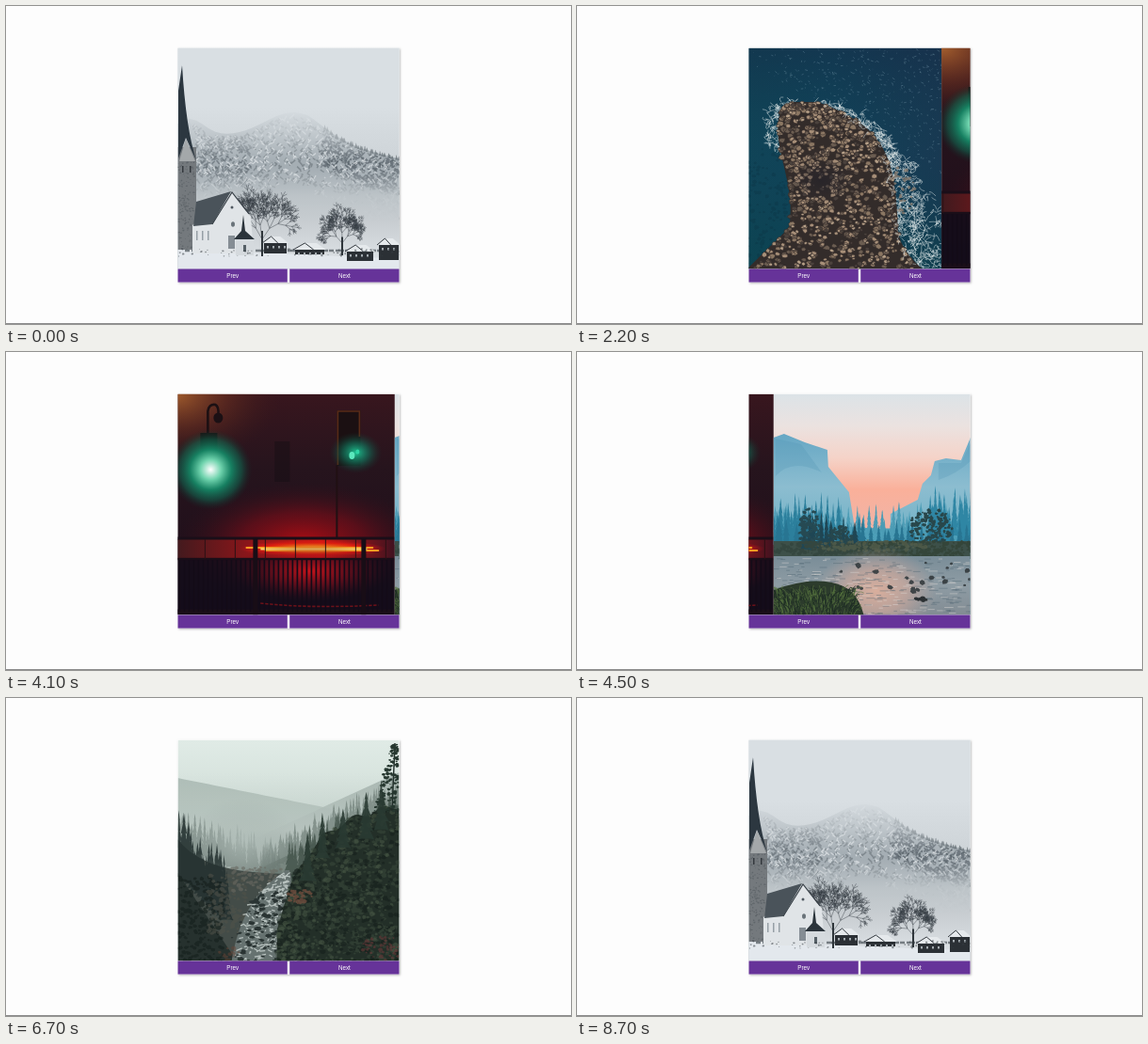
An HTML page for the animation above (9.4 s loop, 600 by 338 pixels).

```html
<!DOCTYPE html>
<html lang="en">
<head>
<meta charset="utf-8">
<title>Image carousel</title>
<style>
html, body { margin: 0; width: 100%; height: 100%; overflow: hidden; background: #fdfdfd; }
svg { display: block; width: 100vw; height: 100vh; }
text { font: 6.27px "Liberation Sans", Arial, sans-serif; fill: #fff; text-anchor: middle; }
</style>
</head>
<body>
<svg id="stage" viewBox="0 0 600 338"></svg>
<script>
const LEFT = 182.5, TOP = 44.5, SIZE = 235, RIGHT = LEFT + SIZE, BASE = TOP + SIZE;
const LOOP = 9400, SLIDE = 600, STARTS = [50, 2050, 4040, 6060, 8050];

let seed = 4217;
const rnd = () => (seed = seed * 16807 % 2147483647) / 2147483647;
const span = (a, b) => a + rnd() * (b - a);
const fix = v => v.toFixed(1);
const many = (n, fn) => Array.from({ length: n }, (_, i) => fn(i)).join('');
const bump = (x, mid, w) => Math.exp(-(((x - mid) / w) ** 2));
const fade = (x, from, w) => Math.exp(-(x - from) / w);

const path = (d, fill, o = 1, more = '') => `<path d="${d}" fill="${fill}" opacity="${o}" ${more}/>`;
const poly = (pts, fill, o) => path(`M${pts}Z`, fill, o);
const line = (d, color, w, o, more = '') => path(d, 'none', o, `stroke="${color}" stroke-width="${w}" ${more}`);
const rect = (x, y, w, h, fill, more = '') =>
  `<rect x="${x}" y="${y}" width="${w}" height="${h}" fill="${fill}" ${more}/>`;
const oval = (x, y, rx, ry, fill) => `<ellipse cx="${x}" cy="${y}" rx="${rx}" ry="${ry}" fill="${fill}"/>`;
const full = fill => rect(LEFT - 3, TOP, SIZE + 6, SIZE, fill);

// Points of a curve y = fn(x), or x = fn(y) when upright
function trace(fn, from, to, upright) {
  const n = 36;
  return many(n + 1, i => {
    const u = from + (to - from) * i / n;
    return (upright ? [fn(u), u] : [u, fn(u)]).map(fix).join() + ' ';
  });
}
const hill = (fn, fill, o, x1 = LEFT, x2 = RIGHT, y = BASE) =>
  poly(`${trace(fn, x1, x2)}${x2},${y} ${x1},${y}`, fill, o);
const strip = (a, b, y1, y2, fill) => poly(trace(a, y1, y2, true) + trace(b, y2, y1, true), fill);

// Gradient stops are evenly spaced "color opacity"
const stops = list => list.map((s, i) => {
  const [c, a = 1] = s.split(' ');
  return `<stop offset="${i / (list.length - 1)}" stop-color="${c}" stop-opacity="${a}"/>`;
}).join('');
const down = (id, y1, y2, ...list) =>
  `<linearGradient id="${id}" gradientUnits="userSpaceOnUse" x1="0" y1="${y1}" x2="0" y2="${y2}">${stops(list)}</linearGradient>`;
const across = (id, ...list) => `<linearGradient id="${id}">${stops(list)}</linearGradient>`;
const glow = (id, ...list) => `<radialGradient id="${id}">${stops(list)}</radialGradient>`;

function chunk(x, y, r, flat = .8) {
  const turn = rnd() * 6, n = 6;
  return 'M' + many(n, i => {
    const a = turn + i * Math.PI * 2 / n, q = r * span(.65, 1.2);
    return `${fix(x + Math.cos(a) * q)},${fix(y + Math.sin(a) * q * flat)} `;
  }) + 'Z';
}
const dash = (x, y, dx, dy) => `M${fix(x)},${fix(y)}l${fix(dx)},${fix(dy)}`;
const curl = (x, y, s) => `M${fix(x)},${fix(y)}q` + many(4, () => fix(span(-s, s)) + ' ');
const specks = (n, x1, x2, y1, y2, r, color, o) =>
  path(many(n, () => chunk(span(x1, x2), span(y1, y2), span(r * .4, r))), color, o);
const bush = (n, x, y, rx, ry, color, o) => path(many(n, () => {
  const a = rnd() * 6.28, q = Math.sqrt(rnd());
  return chunk(x + Math.cos(a) * q * rx, y + Math.sin(a) * q * ry, span(1, 2.8));
}), color, o);

function pine(x, y, h, w) {
  let l = '', r = '';
  for (let i = 1; i <= 6; i++) {
    const yy = y - h + h * i / 6, q = w * i / 12 * span(.7, 1.2);
    r += `L${fix(x + q)},${fix(yy)}L${fix(x + q * .55)},${fix(yy - 1)}`;
    l = `L${fix(x - q * .55)},${fix(yy - 1)}L${fix(x - q)},${fix(yy)}` + l;
  }
  return `M${fix(x)},${fix(y - h)}${r}${l}Z`;
}
// A row of pines whose feet follow foot(x)
const pines = (n, x1, x2, foot, h, w, color, o) => path(many(n, i => {
  const x = x1 + (x2 - x1) * (i + rnd()) / n;
  return pine(x, foot(x), span(h * .55, h), w * span(.8, 1.2));
}), color, o);

function branch(x, y, a, len, depth) {
  const x2 = x + Math.cos(a) * len, y2 = y + Math.sin(a) * len;
  const d = dash(x, y, x2 - x, y2 - y);
  if (!depth) return d;
  const side = s => branch(x2, y2, a + s * span(.4, .9), len * span(.55, .8), depth - 1);
  return d + branch(x2, y2, a + span(-.2, .2), len * .84, depth - 1) + side(-1) + side(1);
}
const bareTree = (x, y, len) =>
  line(`M${x},${y}v${-len * 1.5}`, '#2d3439', 2) + line(branch(x, y, -1.57, len, 6), '#353d43', .55, .8);

function house(x, y, w, h) {
  return rect(x, y, w, h, '#2b3035') +
    path(`M${x - 2},${y + 1}l${w * .4},-7h${w * .4}l${w * .2 + 4},7Z`, '#e5e9ec') +
    line(`M${x - 2},${y + 1}l${w * .4},-7l${w * .3},7`, '#343a40', 1) +
    many(Math.floor(w / 6), i => rect(x + 3 + i * 6, y + 4, 2, 2.5, '#a5acb1'));
}

function village() {
  const ridge = x => 138 + Math.max(0, x - 320) / 4 - 25 * bump(x, 305, 42) - 18 * bump(x, 195, 22);
  const crags = (n, x1, x2, depth, color, w, o) => line(many(n, () => {
    const x = span(x1, x2), lean = rnd() < .5 ? -1 : 1;
    return dash(x, ridge(x) + 2 + rnd() * depth, lean * span(1, 4), span(1, 4));
  }), color, w, o);
  return full('url(#winter)') + hill(ridge, '#a5aeb4') +
    crags(600, 200, RIGHT, 72, '#5c666d', 1.5, .5) + crags(220, 200, 258, 55, '#4f5961', 1.6, .5) +
    crags(320, 335, RIGHT, 36, '#465159', 1.7, .6) + crags(450, 200, RIGHT, 72, '#e4e9ec', 1.2, .7) +
    pines(30, 338, RIGHT, x => ridge(x) + 3, 7, 4, '#59636a', .8) +
    full('url(#haze)') + full('url(#fog)') +
    hill(x => 260 + (x - 200) / 26, '#e3e8ed') +
    line(`M190,260H${RIGHT}`, '#4c555b', 2.5, .7, 'stroke-dasharray="5 2 9 1"') +
    rect(LEFT, 150, 19.5, 109, '#74797d') + specks(170, 183, 201, 165, 258, 1.2, '#53595e', .6) +
    many(2, i => rect(187 + i * 8, 170, 1.5, 7, '#34393e')) +
    path('M187,63Q191,130 202,164L191,140L183,162V90Z', '#2c3740') + poly('191,141 201,165 184,165', '#a4a8aa') +
    bareTree(272, 266, 18) + bareTree(357, 265, 13) +
    poly('240,198 260,224 263,263 198,263 198,233', '#e0e4e7') +
    poly('202,208 239,197 219,232 199,234', '#4a535a') + line('M219,232L240,198L258,221', '#384047', 1.2) +
    oval(240, 214, 1.5, 1.5, '#505961') + oval(241, 232, 2, 2.8, '#6a737a') +
    many(3, i => rect(202 + i * 6, 239, 1.5, 10, '#969fa6')) + rect(236, 244, 7, 14, '#858d94') +
    house(274, 251, 24, 12) + house(307, 258, 31, 6) + house(362, 260, 28, 11) + house(396, 253, 21, 17) +
    rect(244, 247, 19, 18, '#d5dade') + path('M252,222L254,239L264,248H242L250,239Z', '#2b343b') +
    rect(252, 254, 3, 7, '#566067') + specks(80, 183, RIGHT, 258, 266, 1.4, '#353d43', .55);
}

function shore() {
  const west = y => 250 + 16 * fade(y, 100, 8) + 7 * Math.sin((y - 170) / 30) - .8 * Math.max(0, y - 235);
  const east = y => 372 - 92 * fade(y, 100, 30) + 27 * (Math.max(0, y - 235) / 46) ** 2;
  const stones = (n, color, r) => path(many(n, () => {
    const y = span(103, 281), a = west(y);
    return chunk(a + rnd() * (east(y) - a), y, span(r * .55, r));
  }), color, 1, 'stroke="#332b29" stroke-width=".6"');
  const foam = (n, y1, y2, side, a, b, size) => line(many(n, () => {
    const y = span(y1, y2);
    return curl(side(y) + span(a, b), y, size);
  }), '#dfe8e8', .8, .6);
  return full('url(#sea)') + full('url(#deep)') +
    specks(240, LEFT, 258, 150, BASE, 3, '#0b3040', .3) +
    line(many(420, () => {
      const k = Math.sqrt(rnd());
      return dash(205 + k * 212, span(45, 55 + k * 125), span(-1, 3), span(-1, 2));
    }), '#86a9ba', .6, .5) +
    foam(110, 101, 155, west, -13, 5, 7) + foam(230, 101, 170, east, -6, 14, 7) +
    foam(260, 165, BASE, east, -4, 28, 7) + foam(120, 200, 275, east, 8, 44, 8) +
    strip(west, east, 102, 281, '#332c2a') +
    many(3, i => stones(230, ['#6b5d51', '#8b7763', '#a78f78'][i], 4.4 - i * .4)) +
    stones(170, '#b59f87', 2.7) + stones(130, '#4b423d', 3) +
    bush(45, 374, 195, 15, 26, '#8d7e70', .8) + foam(110, 102, BASE, east, -5, 8, 5) +
    oval(290, 185, 34, 24, 'url(#shade)');
}

function signals() {
  const fence = (n, gap, y1, y2, w, color) => line(many(n, i => `M${184 + i * gap},${y1}V${y2}`), color, w);
  const bar = (y, w) => rect(LEFT, y - w / 2, SIZE, w, '#1a0e18');
  return full('url(#night)') + oval(183, 45, 115, 75, 'url(#amber)') + oval(320, 203, 135, 65, 'url(#red)') +
    rect(290, 95, 16, 43, '#160e14', 'opacity=".5"') +
    line('M219,86V63Q220,55 227,56Q231,58 230,68', '#1c1013', 2.6) + oval(230, 70, 5, 5.5, '#1b1014') +
    rect(211, 86, 18, 42, '#1a1313') + oval(222, 125, 44, 43, 'url(#green)') +
    rect(356, 62, 25, 59, '#1b1012') + line('M357,120V63H380V90', '#69331a', 1.6, .8) +
    line('M356,120V198', '#211013', 2) + oval(376, 107, 28, 22, 'url(#teal)') +
    oval(372, 110, 3, 4, '#5be8bd') + oval(378, 106, 2, 2.5, '#2fd3a4') +
    rect(LEFT, 199, SIZE, 21, 'url(#road)') + oval(330, 209, 78, 9, 'url(#flare)') +
    line('M260,208H394M280,211H400', '#ff9a22', 1.8, 1, 'stroke-linecap="round"') + line('M275,209.5H388', '#ffdf70', 2) +
    rect(LEFT, 220, SIZE, 60, '#140d1b', 'opacity=".72"') + oval(328, 233, 82, 32, 'url(#spill)') +
    line('M274,267Q330,273 400,269', '#9c1419', 1.5, .65) +
    bar(198, 3) + bar(220, 2.4) + bar(276, 5) +
    fence(48, 5, 221, 276, 1.7, '#130b17') + fence(8, 32, 199, 220, 1, '#2b1115') +
    many(2, i => rect(267 + i * 115, 198, 5, 82, '#180d16'));
}

function valley() {
  const rough = (y, s) => () => y + span(-s, s);
  const ripples = (n, color, o) => line(many(n, () => dash(span(180, 412), span(219, BASE), span(3, 10), 0)), color, .8, o);
  const grass = (n, color, o) => line(many(n, () => {
    const x = span(178, 268), s = (x - 222) / 8 + span(-5, 5);
    return `M${fix(x)},${fix(span(256, 282))}q${fix(s / 3)},-8 ${fix(s)},${fix(span(-10, -4))}`;
  }), color, .9, o);
  return '<g transform="translate(1.5 0)">' + full('url(#dusk)') +
    poly('305,172 334,157 339,140 348,131 352,116 364,113 380,115 390,91 402,88 418,95 418,205 305,205', 'url(#cliff)') +
    poly('178,92 192,87 214,96 238,104 239,122 261,149 270,205 178,205', 'url(#cliff)') +
    path('M183,92L210,98L232,128Q200,112 183,132Z', '#4b8fb0', .25) +
    path('M356,118H380L391,95L396,110Q380,128 356,136Z', '#4b8fb0', .25) +
    hill(x => 188 - 14 * bump(x, 180, 60) - 18 * bump(x, 425, 60), '#4d9fb8') +
    pines(55, 180, 420, rough(195, 6), 34, 8, '#4c9cb5') +
    pines(18, 180, 250, rough(203, 5), 56, 10, '#2c7f9c') + pines(24, 345, 420, rough(200, 6), 58, 10, '#2f86a4') +
    pines(36, 180, 420, rough(205, 4), 30, 9, '#287592') +
    rect(178, 201, 242, 19, '#3d5049') + pines(9, 207, 268, rough(209, 4), 44, 11, '#1f4654') +
    bush(130, 219, 188, 11, 22, '#264a53') + bush(170, 348, 186, 23, 19, '#28474b') +
    bush(80, 252, 198, 13, 13, '#27474d') + bush(340, 335, 209, 88, 9, '#34453a') +
    bush(190, 230, 209, 55, 7, '#34463f') + bush(120, 285, 206, 60, 6, '#56604c', .7) +
    rect(178, 217, 242, 64, 'url(#river)') + oval(290, 254, 65, 46, 'url(#blush)') +
    ripples(230, '#4d626e', .5) + ripples(120, '#dcd8d6', .55) +
    specks(26, 250, 415, 224, 254, 4, '#343a3d', .9) +
    bush(16, 337, 263, 6, 2.5, '#2b3033') +
    path('M178,281V254Q225,236 255,249Q272,258 277,281Z', '#2c3b2c') +
    grass(240, '#56733f', .65) + grass(120, '#1b2a22', .8) + '</g>';
}

function gorge() {
  const crest = x => 112 + 125 * fade(x, 286, 34) + (RIGHT - x) * .1 + 3 * Math.sin(x / 5);
  const slope = x => 154 - .46 * (x - 276);
  const left = y => 232 + 65 * fade(y, 183, 45);
  const right = y => 298 + 5 * Math.sin((y - 176) / 12);
  const leaves = (n, color, o) => path(many(n, () => {
    const x = span(288, RIGHT);
    return chunk(x, span(crest(x) - 1, 281), span(1, 3.6));
  }), color, o);
  return full('url(#pale)') + hill(x => 85 + (x - 182) * .2, '#a9b8b2', .9) +
    hill(x => slope(x) - 10, '#a4b2ac', .9, 260) + full('url(#mist)') +
    hill(x => slope(x) + 24, '#5f6f67', .6, 262) +
    pines(44, 272, RIGHT, x => slope(x) + 30, 40, 10, '#65746d', .6) +
    pines(34, 300, RIGHT, x => slope(x) + 48, 46, 12, '#415249', .8) +
    hill(x => slope(x) + 46, '#3a4a41', .9, 302) +
    pines(34, 183, 290, x => 158 + (x - 183) * .4, 50, 10, '#687771', .55) +
    oval(252, 150, 55, 44, 'url(#cloud)') +
    hill(x => 150 + 38 * (1 - fade(x, 182, 32)), '#434c48', 1, LEFT, 303) +
    pines(26, 183, 235, x => 185 + (x - 183), 72, 15, '#24312f', .85) +
    hill(x => 185 + (x - 182) * 1.5, '#222d2a', .85, LEFT, 245) +
    specks(220, 183, 232, 190, BASE, 3.2, '#18211f', .7) + specks(150, 215, 255, 188, 250, 3, '#515249', .55) +
    specks(90, 240, 294, 180, 205, 2.8, '#6a6a61', .6) +
    strip(left, right, 183, 281, '#667270') +
    line(many(230, () => {
      const y = span(185, BASE), a = left(y);
      return dash(a + rnd() * (right(y) - a), y, span(-7, 5), span(0, 3));
    }), '#d9e1de', 1.3, .7) +
    path(many(110, () => {
      const y = span(203, BASE), a = left(y);
      return chunk(a + span(-.1, 1) * (right(y) - a), y, span(1, 4), .6);
    }), '#2a3433') +
    hill(crest, '#232f28', 1, 288) + leaves(620, '#37473a', .6) + leaves(420, '#17221d', .7) + leaves(230, '#4d5c49', .5) +
    bush(45, 312, 211, 13, 8, '#7a5140', .7) + bush(60, 400, 266, 22, 13, '#69393a', .6) +
    bush(20, 237, 272, 11, 7, '#694537', .5) +
    line('M413,48L410,120', '#202d29', 1.4) +
    path(many(150, () => {
      const y = span(48, 122);
      return chunk(span(410 - (y - 44) * .25, RIGHT), y, span(1, 2.8), .6);
    }), '#26372f') +
    pines(5, 318, 400, x => crest(x) + 25, 55, 16, '#2a3a32', .9);
}

const defs = `<defs>
  <clipPath id="card">${rect(LEFT, TOP, SIZE, SIZE, '#000')}</clipPath>
  <filter id="lift" x="-5%" y="-5%" width="110%" height="110%">
    <feDropShadow dx="1" dy="1" stdDeviation="1.2" flood-opacity=".3"/></filter>` +
  down('winter', 45, 280, '#dce2e6', '#d5dbdf', '#c6ccd0', '#d9dee2') +
  down('haze', 108, 165, '#d9dfe3', '#d3d9dd .6', '#d0d6da 0') +
  down('fog', 172, 262, '#bcc3c8 0', '#bfc6ca .9', '#c9ced2', '#d8dde1') +
  across('sea', '#104557', '#11435a', '#1a3852') +
  down('deep', 45, 280, '#152b46 .5', '#0d4052 .1', '#08434c .6') +
  glow('shade', '#1d1d28 .5', '#1d1d28 0') +
  down('night', 45, 280, '#38161e', '#26141d', '#21101b', '#120b18') +
  glow('amber', '#b56a30 .85', '#7a3821 .45', '#421b17 0') +
  glow('red', '#c90d12 .85', '#870d18 .55', '#33101a 0') +
  glow('green', '#fff', '#6fd3ad', '#158c69 .9', '#0f6a52 .55', '#122c29 0') +
  glow('teal', '#1fc493', '#10795f .6', '#12372f 0') +
  across('road', '#3f1a1e', '#89161a', '#d31912', '#3f1220') +
  glow('flare', '#ffe066', '#ff7a16', '#e5200f .9', '#d0101a 0') +
  glow('spill', '#e4141b .85', '#990f1d .5', '#410d1b 0') +
  down('dusk', 45, 180, '#dce3e7', '#ebe2e0', '#f5d3c8', '#fab09a', '#f2b3a4') +
  down('cliff', 87, 200, '#66a7c4', '#8cbdd0', '#6fb0c4') +
  down('river', 215, 280, '#788c97', '#8e9ca4', '#828c93') +
  glow('blush', '#e6b29c .85', '#d8ab9b .6', '#c5a9a2 0') +
  down('pale', 45, 200, '#e0ebe6', '#d0ddd7', '#a7b3ae') +
  down('mist', 80, 200, '#c6d2cd 0', '#bdc9c4 .7', '#8d9994 .8') +
  glow('cloud', '#b2bfba .75', '#a2afaa 0') + '</defs>';

const slides = [village, shore, signals, valley, gorge].map((draw, i) =>
  `<g transform="translate(${i * SIZE} 0)"><g clip-path="url(#card)">${draw()}</g></g>`).join('');

const button = (x, label) =>
  rect(x, BASE, 116.3, 14.1, '#663399') + `<text x="${x + 58.15}" y="288.8">${label}</text>`;

document.getElementById('stage').innerHTML = defs +
  rect(0, 0, 600, 338, '#fdfdfd') + rect(0, 337, 600, 1, '#8c8c8c') +
  rect(LEFT, TOP, SIZE, 249.1, '#fff', 'filter="url(#lift)"') +
  `<g clip-path="url(#card)"><g id="track">${slides}</g></g>` +
  button(LEFT, 'Prev') + button(301.2, 'Next');

// Ease-in-out, cubic-bezier(.42, 0, .58, 1)
function ease(x) {
  if (x <= 0) return 0;
  if (x >= 1) return 1;
  let lo = 0, hi = 1, s;
  for (let i = 0; i < 24; i++) {
    s = (lo + hi) / 2;
    const q = 1 - s;
    if (1.26 * q * q * s + 1.74 * q * s * s + s * s * s < x) lo = s; else hi = s;
  }
  return s * s * (3 - 2 * s);
}

const track = document.getElementById('track');
let shown;
function show(ms) {
  const t = Math.floor(ms % LOOP / 100) * 100;
  if (t === shown) return;
  shown = t;
  // The last move rewinds to the first slide
  const pos = STARTS.reduce((sum, start, i) => sum + (i < 4 ? 1 : -4) * ease((t - start) / SLIDE), 0);
  track.setAttribute('transform', `translate(${(-pos * SIZE).toFixed(2)} 0)`);
}

show(0);
let begin;
function tick(now) {
  begin ??= now;
  show(now - begin);
  requestAnimationFrame(tick);
}
requestAnimationFrame(tick);
</script>
</body>
</html>
```
